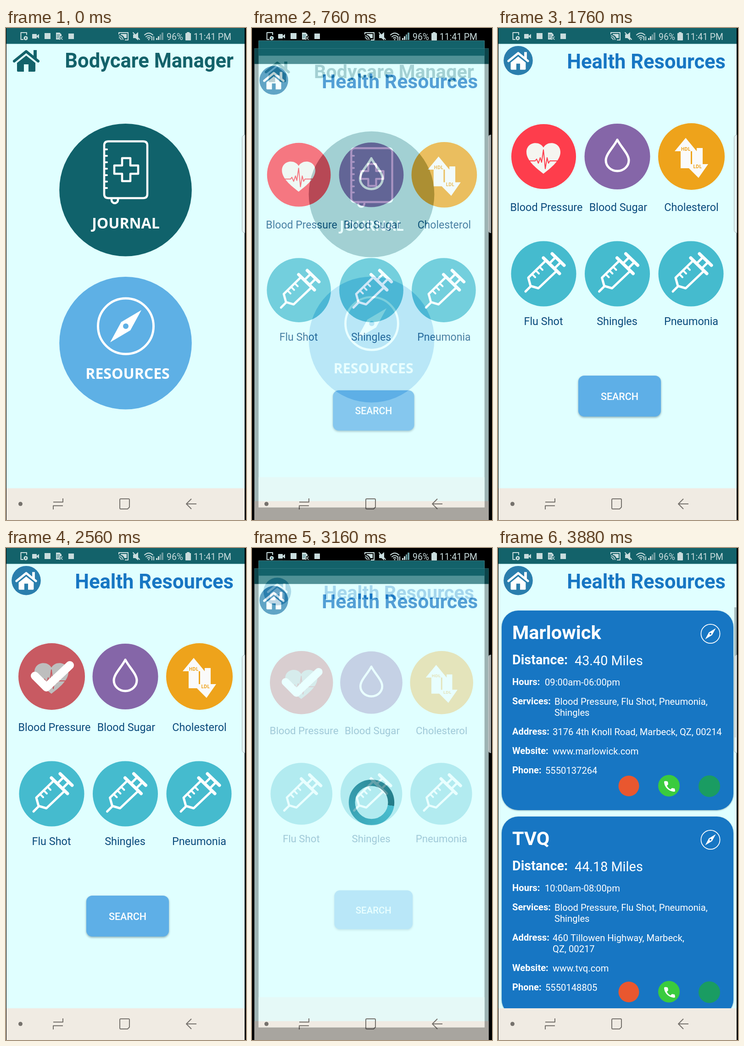
Write an HTML page with a canvas that moves like this. It is 523 px wide and 1070 px high and loops after 5.24 s.

```html
<!DOCTYPE html>
<html lang="en">
<head>
<meta charset="utf-8">
<title>Health app walkthrough</title>
<style>
html, body { margin: 0; width: 100%; height: 100%; overflow: hidden; background: #000; }
canvas { display: block; }
</style>
</head>
<body>
<canvas id="stage" width="523" height="1070"></canvas>
<script>
const W = 523, H = 1070, LOOP = 5240, STEP = 40, MID = 260.5;
const ctx = document.getElementById('stage').getContext('2d');
const TEAL = '#13626a', SKY = '#5eb0e5', BLUE = '#1776c3', CYAN = '#e0ffff';

function fill(path, color) {
  ctx.fillStyle = color;
  ctx.fill(new Path2D(path));
}

function stroke(path, color, width, cap = 'round') {
  ctx.strokeStyle = color;
  ctx.lineWidth = width;
  ctx.lineCap = cap;
  ctx.lineJoin = 'round';
  ctx.stroke(new Path2D(path));
}

function disc(x, y, r, color) {
  ctx.fillStyle = color;
  ctx.beginPath();
  ctx.arc(x, y, r, 0, 7);
  ctx.fill();
}

function box(x, y, w, h, color, r = 0) {
  ctx.fillStyle = color;
  ctx.beginPath();
  ctx.roundRect(x, y, w, h, r);
  ctx.fill();
}

function text(str, x, y, size, color = '#fff', weight = 400, align = 'left', family = 'Roboto') {
  ctx.font = `${weight} ${size}px ${family}, sans-serif`;
  ctx.fillStyle = color;
  ctx.textAlign = align;
  ctx.fillText(str, x, y);
}

// Runs draw with the origin moved to x, y and scaled.
function at(x, y, scale, draw) {
  ctx.save();
  ctx.translate(x, y);
  ctx.scale(scale, scale);
  draw();
  ctx.restore();
}

function house(x, y, scale, color) {
  at(x, y, scale, () => {
    stroke('M-26 1L0-20L26 1', color, 6);
    fill('M16-23h7v21l-7-6z', color);
    fill('M-20 5L0-11L20 5V22q0 2-2 2H5V8H-5V24H-18q-2 0-2-2z', color);
  });
}

function compass(x, y, scale, color) {
  at(x, y, scale, () => {
    stroke('M60.5 0A60.5 60.5 0 1 1-60.5 0A60.5 60.5 0 1 1 60.5 0', '#fff', 5);
    fill('M34-35L10 9L-34 35L-10-9z', '#fff');
    disc(0, 0, 6, color);
  });
}

function frame(draw) {
  box(1, 0, 519, H, CYAN);
  draw();
  box(1, 0, 519, 34.5, TEAL);
  box(1, 1001, 519, 69, '#f0ebe3');
}

function home() {
  house(44, 71, 1, TEAL);
  text('Bodycare Manager', 496, 85.5, 43.5, TEAL, 700, 'right');

  disc(MID, 352.3, 144.3, '#10626b');
  stroke('M223 246.5H299q9 0 9 9V361q0 9-9 9H223q-9 0-9-9V255.500q0-9 9-9z', '#fff', 4.5);
  for (let y = 264; y < 360; y += 14) stroke(`M214 ${y}h6`, '#fff', 4);
  stroke('M253 283h18v16h17v18h-17v16h-18v-16h-17v-18h17z', '#fff', 4.5);
  stroke('M230 371v3a7 7 0 0 0 14 0v-3', '#fff', 4.5);
  text('JOURNAL', 261, 436, 32, '#fff', 700, 'center', '"Open Sans"');

  disc(MID, 685.3, 144.3, SKY);
  compass(261, 648.5, 1, SKY);
  text('RESOURCES', 265, 763, 32, '#fff', 700, 'center', '"Open Sans"');
}

function header() {
  disc(44, 70.7, 31.8, '#2a7ead');
  house(44, 71, 0.82, '#fff');
  text('Health Resources', 496, 88, 43.5, BLUE, 700, 'right');
}

function syringe(x) {
  disc(x, 534.5, 71, '#45bbce');
  at(x - 99.5, 0, 1, () => {
    stroke('M104 506L66 543L71 561L88 566L127 529M60 573L71 562', '#fff', 5);
    stroke('M75 536l6 6M83 528l6 6M91 520l6 6', '#fff', 4);
    stroke('M113 511L125 499M124 522L136 510', '#fff', 5);
    stroke('M99 500L134 534M118 491L144 516', '#fff', 7);
  });
}

function pressure(selected) {
  const color = selected ? '#c85a62' : '#fe3d4c';
  disc(99.5, 279.5, selected ? 72.5 : 70.5, color);
  fill('M99 317C88 308 62 290 62 270C62 248 90 244 99 260C108 244 136 248 136 270C136 290 110 308 99 317z',
    selected ? '#bebebe' : '#f5f5f0');
  stroke('M64 289H81L84 285L88 294L92 282L95 292L99 265L103 306L107 282L110 294L113 289H134', color, 2);
  if (selected) stroke('M63 278L88 303L139 255', '#fff', 18);
}

function options(selected) {
  header();
  pressure(selected);

  disc(260, 279.5, 71.5, '#8566a8');
  stroke('M260 243C252 259 235 274 235 288A25 23 0 0 0 285 288C285 274 268 259 260 243z', '#fff', 5);

  const amber = '#eea31b';
  disc(421.5, 279.5, 72.5, amber);
  fill('M409 239L433 268V261H446V296H458L437 326L416 305H398V268H385z', '#fafafa');
  fill('M420 268h3v28h-3z', amber);
  text('HDL', 409, 267, 10, amber, 700, 'center', '"Open Sans"');
  text('LDL', 434.5, 305, 10, amber, 700, 'center', '"Open Sans"');

  [99.5, 260, 420.5].forEach(syringe);
  const label = (str, x, y) => text(str, x, y, 23.4, '#0a4a7c', 400, 'center');
  label('Blood Pressure', 105.5, 398);
  label('Blood Sugar', 262, 398);
  label('Cholesterol', 421.5, 398);
  label('Flu Shot', 99, 646);
  label('Shingles', 259.5, 646);
  label('Pneumonia', 421, 646);

  ctx.save();
  ctx.shadowColor = 'rgba(0,50,70,.4)';
  ctx.shadowBlur = 4;
  ctx.shadowOffsetY = 2;
  box(175, 756, 180, 89, '#5eafe7', 13);
  ctx.restore();
  text('SEARCH', 265, 809, 21.5, '#fff', 500, 'center');
}

function loading(t) {
  header();
  const angle = (9 + (t - 3160) * 0.092) * Math.PI / 180;
  const ring = ctx.createConicGradient(angle, MID, 517.5);
  ring.addColorStop(0, '#49bfd1');
  ring.addColorStop(0.5, '#3191a3');
  ring.addColorStop(1, '#145f68');
  ctx.strokeStyle = ring;
  ctx.lineWidth = 14;
  ctx.beginPath();
  ctx.arc(MID, 517.5, 43.5, 0, 7);
  ctx.stroke();
}

const shops = [
  { name: 'Marlowick', miles: '43.40', hours: '09:00am-06:00pm', site: 'www.marlowick.com',
    address: ['3176 4th Knoll Road, Marbeck, QZ, 00214'], phone: '5550137264' },
  { name: 'TVQ', miles: '44.18', hours: '10:00am-08:00pm', site: 'www.tvq.com',
    address: ['460 Tillowen Highway, Marbeck,', 'QZ, 00217'], phone: '5550148805' }
];

function row(label, x, y, lines) {
  text(label, 31, y, 20.2, '#fff', 700);
  lines.forEach((line, i) => text(line, x, y + 1 + i * 24, 20.2));
}

function card(shop, top) {
  const extra = (shop.address.length - 1) * 24;
  ctx.save();
  ctx.translate(0, top);
  ctx.shadowColor = 'rgba(0,50,70,.4)';
  ctx.shadowBlur = 3;
  ctx.shadowOffsetY = 1;
  box(8, 0, 505, 434, BLUE, 36);
  ctx.shadowColor = 'transparent';

  text(shop.name, 31, 62, 41.5, '#fff', 700);
  compass(463, 50.5, 0.34, BLUE);
  text('Distance:', 31, 117, 28.8, '#fff', 700);
  text(shop.miles + ' Miles', 167, 118.5, 28.8);
  row('Hours:', 102, 161.5, [shop.hours]);
  row('Services:', 123, 203.5, ['Blood Pressure, Flu Shot, Pneumonia,', 'Shingles']);
  row('Address:', 119, 269.5, shop.address);
  row('Website:', 119, 311.5 + extra, [shop.site]);
  row('Phone:', 103, 353.5 + extra, [shop.phone]);

  disc(285, 381.5, 22.5, '#e9572f');
  disc(372.5, 381, 23.5, '#3acb3e');
  fill('M362 372q2-2 5-1l3 1 1 6-3 3q3 6 8 8l3-3 6 1 1 5q0 2-2 2C371 393 362 383 362 372z', '#fff');
  disc(460.5, 382, 23.5, '#1a9c62');
  ctx.restore();
}

function results() {
  header();
  card(shops[0], 136);
  card(shops[1], 584);
  box(515, 129, 6, 283, 'rgba(110,120,125,.5)');
}

function statusIcons() {
  const c = '#c9dcdd';
  stroke('M38 25H32.500V10H45V15', c, 2, 'butt');
  disc(43, 22, 4.5, c);
  box(42, 20, 2, 4, TEAL);
  box(57, 13, 10, 10, c, 1);
  fill('M66 18l6-5v10z', c);
  box(84, 11, 13, 13, c);
  fill('M109 10h8l4 4v4h-4v7h-8z', c);
  stroke('M111 15h6M111 18h5M111 21h4', TEAL, 1);
  stroke('M117 19l6 6M123 19l-6 6', c, 1.5);
  box(136, 12, 12, 12, c);

  stroke('M246 14V10H266V26H259', c, 2, 'butt');
  stroke('M246 17a9 9 0 0 1 9 9M246 21a5 5 0 0 1 5 5', c, 2, 'butt');
  fill('M250 13h13v9h-5q-2-6-8-7z', c);
  fill('M277 14h5l6-5v18l-6-5h-5z', c);
  stroke('M277 10L291 25', c, 2);
  stroke('M302 15q9-8 18 0M305 19q6-5 12 0M308 22q3-2 6 0', c, 2);
  disc(311, 25, 1.5, c);
  stroke('M318 19v7M322 19v7', c, 2);
  box(327, 22, 3, 4, c);
  box(331, 18, 3, 8, c);
  box(335, 14, 3, 12, '#6b9a9f');
  box(339, 10, 4, 16, '#6b9a9f');
  text('96%', 350, 26, 19.4, c);
  box(391, 11, 12, 16, c, 1);
  box(394, 9, 6, 3, c);
  text('11:41 PM', 491, 26, 19.4, c, 400, 'right');
}

function navIcons() {
  const c = '#76726d';
  disc(31.5, 1035, 4.5, c);
  stroke('M103 1031H124V1023M124 1039H103V1047', c, 2, 'butt');
  stroke('M265 1046H250q-2 0-2-2V1026q0-2 2-2H267q2 0 2 2V1042z', c, 2, 'butt');
  stroke('M415 1035H394M404 1024L393 1035L404 1046', c, 2, 'butt');
}

function edgeHandle() {
  ctx.beginPath();
  ctx.roundRect(514.5, 232.5, 12, 213, [6, 0, 0, 6]);
  ctx.fillStyle = 'rgba(232,240,240,.72)';
  ctx.strokeStyle = '#a9b5b5';
  ctx.lineWidth = 1;
  ctx.fill();
  ctx.stroke();
}

function page(draw, scale = 1, dy = 0) {
  ctx.save();
  ctx.translate(MID, H / 2 + dy);
  ctx.scale(scale, scale);
  ctx.translate(-MID, -H / 2);
  frame(draw);
  ctx.restore();
}

// Holds what lies under a translucent page, so that the page blends as one layer.
const under = document.createElement('canvas');
under.width = W;
under.height = H;

const easeOut = u => 1 - (1 - Math.min(1, Math.max(0, u))) ** 3;

// The old page shrinks while the new one rises and fades in.
function openPage(before, after, t) {
  const out = easeOut(t / 400), come = easeOut((t - 160) / 240);
  page(before, 1 - 0.055 * out);
  if (come === 0) return;
  const copy = under.getContext('2d');
  copy.clearRect(0, 0, W, H);
  copy.drawImage(ctx.canvas, 0, 0);
  ctx.clearRect(0, 0, W, H);
  page(after, 0.945 + 0.055 * come, 120 * (1 - come));
  ctx.save();
  ctx.globalCompositeOperation = 'destination-in';
  ctx.globalAlpha = come;
  ctx.fillRect(0, 0, W, H);
  ctx.globalCompositeOperation = 'destination-over';
  ctx.globalAlpha = 1;
  ctx.drawImage(under, 0, 0);
  ctx.restore();
}

function render(t) {
  ctx.clearRect(0, 0, W, H);
  statusIcons();
  const spinner = () => loading(Math.min(t, 3800));
  const choices = () => options(t >= 2560);
  const moving = (t >= 520 && t < 920) || (t >= 2920 && t < 3320);
  if (t < 520) page(home);
  else if (t < 920) openPage(home, choices, t - 520);
  else if (t < 2920) page(choices);
  else if (t < 3320) openPage(choices, spinner, t - 2920);
  else if (t < 3880) page(spinner);
  else page(results);

  if (!moving) statusIcons();
  ctx.globalCompositeOperation = 'source-atop';
  navIcons();
  ctx.globalCompositeOperation = 'source-over';
  edgeHandle();
  box(521, 0, 2, H, '#000');
}

function tick(now) {
  render(Math.floor(now % LOOP / STEP) * STEP);
  requestAnimationFrame(tick);
}
requestAnimationFrame(tick);
</script>
</body>
</html>
```
